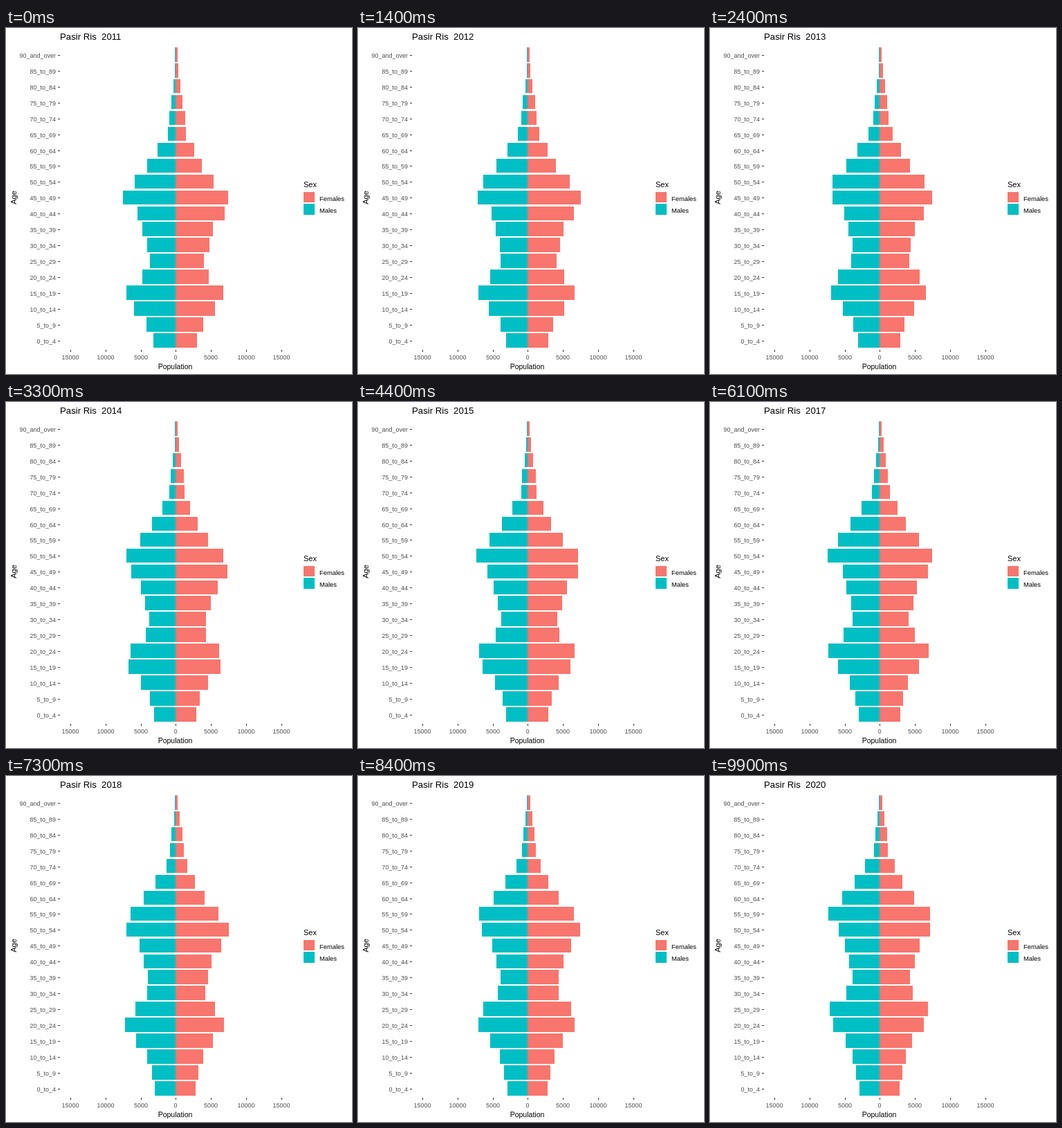
Write an HTML page that moves like this. It is 500 px wide and 500 px high and loops after 10000 ms.

```html
<!DOCTYPE html>
<html lang="en">
<head>
<meta charset="utf-8">
<title>Population pyramid</title>
<style>
  html, body { margin: 0; width: 100%; height: 100%; overflow: hidden; background: #fff; }
  svg { display: block; width: 500px; height: 500px; }
  text { font-family: "Liberation Sans", Arial, sans-serif; font-size: 11px; fill: #000; white-space: pre; }
  rect { shape-rendering: crispEdges; }
  .label { font-size: 9px; fill: #4d4d4d; }
  .key { font-size: 9.4px; }
  .tick { fill: #333; }
  .male { fill: #00bfc4; }
  .female { fill: #f8766d; }
  #title { font-size: 13.2px; }
</style>
</head>
<body>
<svg id="chart" viewBox="0 0 500 500">
  <text id="title" x="78" y="17">Pasir Ris  2011</text>
  <text x="244.5" y="493" text-anchor="middle" style="font-size:10.5px">Population</text>
  <text transform="translate(15 245) rotate(-90)" text-anchor="middle">Age</text>
  <text x="430" y="230">Sex</text>
  <rect class="female" x="430" y="237" width="16" height="15"/>
  <rect class="male" x="430" y="254" width="16" height="16"/>
  <text class="key" x="453" y="250">Females</text>
  <text class="key" x="453" y="267">Males</text>
</svg>
<script>
const LOOP = 10000, STEP = 100, FIRST = 2011, YEARS = 9;
const GROUPS = 19, SPAN = 5;
const ZERO = 245, BOTTOM = 452.02, PITCH = 22.96, HALF = 10.33;

// Cohort sizes in pixels, from the not yet born (two groups) to the oldest
const UNBORN = 2;
const MALES = [23, 27.5, 32, 41.5, 59.5, 71, 48, 37, 41, 48, 54.5, 75.5, 59, 41, 26, 11, 9, 6, 3, 1, 1];
const FEMALES = [22.5, 27, 31, 39.5, 56.5, 68.5, 47.5, 41, 48.5, 54, 71, 76, 55, 37.5, 26.5, 15, 13.5, 10, 7, 4, 3];

const chart = document.getElementById('chart');
const title = document.getElementById('title');

function add(tag, attrs, text = '') {
  const el = document.createElementNS('http://www.w3.org/2000/svg', tag);
  for (const name in attrs) el.setAttribute(name, attrs[name]);
  el.textContent = text;
  chart.append(el);
  return el;
}

function addGroup(i) {
  const mid = BOTTOM - PITCH * i;
  const y = Math.floor(mid - HALF);
  const height = Math.floor(mid + HALF) - y;
  const from = i * SPAN;
  const age = from + (i < GROUPS - 1 ? `_to_${from + SPAN - 1}` : '_and_over');
  add('text', { class: 'label', x: 72, y: Math.round(mid) + 4, 'text-anchor': 'end' }, age);
  add('rect', { class: 'tick', x: 75, y: Math.round(mid), width: 3, height: 1 });
  return {
    male: add('rect', { class: 'male', y, height }),
    female: add('rect', { class: 'female', x: ZERO, y, height })
  };
}

for (let i = -3; i <= 3; i++) {
  const x = Math.round(245.4 + i * 50.85);
  add('rect', { class: 'tick', x, y: 465, width: 1, height: 3 });
  add('text', { class: 'label', x, y: 479, 'text-anchor': 'middle' }, Math.abs(i) * 5000);
}
const bars = Array.from({ length: GROUPS }, (_, i) => addGroup(i));

// Catmull-Rom curve through evenly spaced points
function curve(points, x) {
  const at = i => points[Math.max(0, Math.min(points.length - 1, i))];
  const i = Math.floor(x), u = x - i;
  const [a, b, c, d] = [at(i - 1), at(i), at(i + 1), at(i + 2)];
  return b + u / 2 * (c - a + u * (2 * a - 5 * b + 4 * c - d + u * (3 * (b - c) + d - a)));
}

// Cohorts move up one group every five years; the young gain people, the old lose them
function lengthOf(cohorts, group, t) {
  const cohort = group - t / SPAN;
  const gain = Math.max(5.5 - 0.65 * Math.max(cohort, 0), -2);
  return Math.max(1, Math.round(curve(cohorts, cohort + UNBORN) + gain * t / YEARS));
}

function draw(ms) {
  const step = Math.floor((ms % LOOP) / STEP);
  const t = YEARS * step / (LOOP / STEP - 1);
  title.textContent = `Pasir Ris  ${FIRST + Math.round(t)}`;
  bars.forEach(({ male, female }, i) => {
    const width = lengthOf(MALES, i, t);
    male.setAttribute('x', ZERO - width);
    male.setAttribute('width', width);
    female.setAttribute('width', lengthOf(FEMALES, i, t));
  });
}

const start = performance.now();
function tick() {
  draw(performance.now() - start);
  requestAnimationFrame(tick);
}
tick();
</script>
</body>
</html>
```
